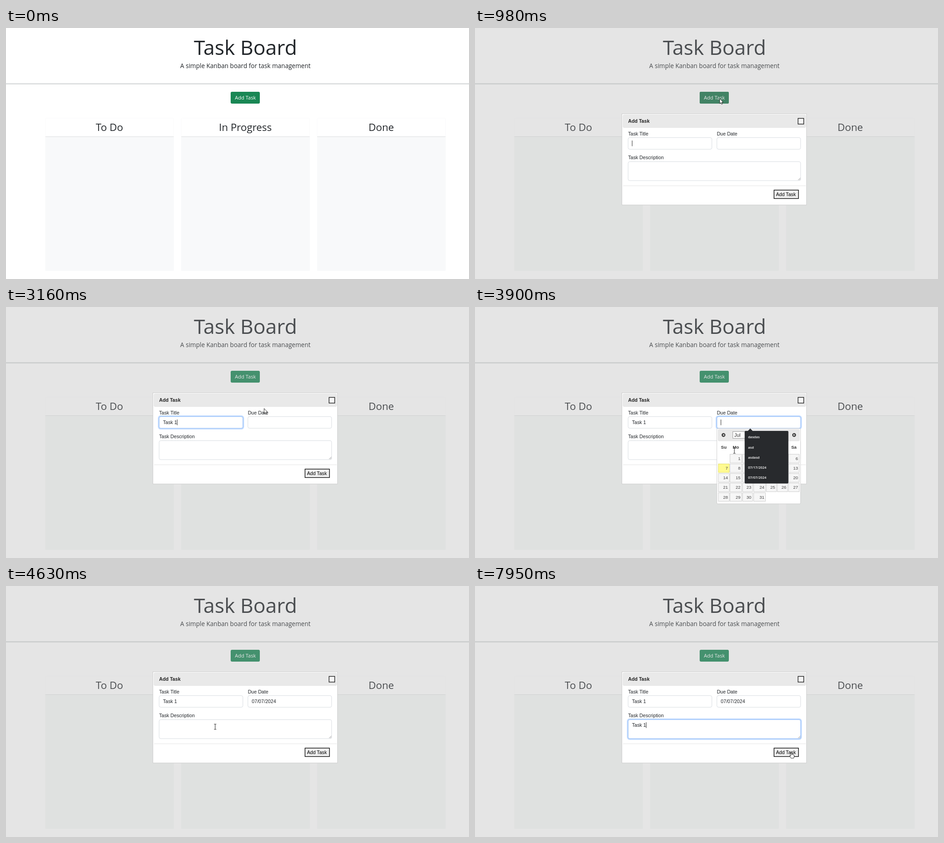
Animation of 1016x551 px, one loop 8 s. Source, as an HTML page:

```html
<!DOCTYPE html>
<html lang="en">
<head>
<meta charset="utf-8">
<title>Task Board</title>
<style>
html, body { margin: 0; width: 100%; height: 100%; overflow: hidden; background: #fff; }
svg { display: block; }
text { font: 10.65px "Liberation Sans", Arial, sans-serif; fill: #212529; white-space: pre; }
.page text { font-family: "Open Sans", sans-serif; text-anchor: middle; }
.page .title { font-size: 44.4px; }
.page .lead { font-size: 13.55px; }
.page .head { font-size: 22.3px; }
.page .btn { font-size: 11.1px; fill: #fff; }
.bold { font-weight: 700; }
.field { fill: #fff; stroke: #ced4da; stroke-width: .8; }
.ring rect { fill: none; stroke: #c2dbfe; stroke-width: 2.7; }
.ring rect + rect { stroke: #86b7fe; stroke-width: .8; }
.menu rect, .menu path { fill: #282a2d; }
.menu text { font: 600 7.5px "Open Sans", sans-serif; fill: #fff; }
.cal text { font-size: 9.6px; fill: #333; }
.cal .day { text-anchor: end; fill: #454545; }
.cal .mid { text-anchor: middle; }
</style>
</head>
<body>
<svg width="1016" height="551" viewBox="0 0 1016 551">
  <g class="page">
    <rect width="1016" height="551" fill="#fff"/>
    <text class="title" x="525.5" y="59">Task Board</text>
    <text class="lead" x="525.3" y="88.2">A simple Kanban board for task management</text>
    <rect y="121" width="1016" height="3" fill="#dee0e1"/>
    <rect x="493" y="140" width="64" height="26" rx="3" fill="#198754"/>
    <rect id="hover" x="493" y="140" width="64" height="26" rx="3" fill="#157347"/>
    <text class="btn" x="525.3" y="157">Add Task</text>
    <g id="columns"></g>
  </g>

  <g id="modal">
    <rect width="1016" height="551" fill="#aaa" opacity=".3"/>
    <g id="shade"></g>
    <rect x="322.3" y="188.3" width="405.2" height="200" fill="#fff" stroke="#c5c5c5" stroke-width=".8"/>
    <rect x="324.8" y="190.8" width="401" height="27.6" rx="2" fill="#e9e9e9" stroke="#ddd" stroke-width=".7"/>
    <text class="bold" x="336" y="208" style="fill:#222">Add Task</text>
    <rect x="708.9" y="198.4" width="12.5" height="12.5" fill="#f6f6f6" stroke="#111" stroke-width="1.3"/>
    <text x="336" y="236">Task Title</text>
    <text x="530.7" y="236">Due Date</text>
    <text x="336" y="288.2">Task Description</text>
    <g id="fields"></g>
    <path d="M709 334l5-5M711.7 334l2.3-2.3" stroke="#777" stroke-width=".7"/>
    <path d="M325 346.4H726" stroke="#ddd" stroke-width=".8"/>
    <rect x="656.2" y="355.8" width="53.6" height="18.6" fill="#efefef" stroke="#000" stroke-width="1.33"/>
    <text x="660.4" y="368.5" style="fill:#000">Add Task</text>
    <path id="caret" d="M.4 0v12.5" stroke="#111" stroke-width=".9"/>
  </g>

  <g id="calendar" class="cal">
    <rect x="530.7" y="266.8" width="183.7" height="165.2" rx="2" fill="#fff" stroke="#c5c5c5" stroke-width=".8"/>
    <rect x="533.5" y="269" width="178.4" height="25" rx="2" fill="#e9e9e9" stroke="#ddd" stroke-width=".7"/>
    <g fill="#444"><circle cx="545.3" cy="281" r="4.2"/><circle cx="700.3" cy="281" r="4.2"/></g>
    <path d="M546.6 278.7v4.6l-3-2.3zM699 278.7v4.6l3-2.3z" fill="#fff"/>
    <g fill="#fff" stroke="#767676" stroke-width=".7">
      <rect x="565.8" y="273.6" width="55" height="14.6"/><rect x="623.6" y="273.6" width="56" height="14.6"/>
    </g>
    <text x="569" y="285" style="font-size:10.65px">Jul</text>
    <text x="627" y="285" style="font-size:10.65px">2024</text>
    <g id="days"></g>
  </g>

  <g id="titleMenu" class="menu"></g>
  <g id="dateMenu" class="menu"></g>

  <g id="pointer" stroke="#000" stroke-linejoin="round">
    <path d="M0 0V11L2.5 8.7L4.2 12.4L6 11.6L4.4 8H7.7Z" fill="#fff" stroke-width=".8"/>
    <path d="M-2.4 -5.8H-.7L0 -5.3L.7 -5.8H2.4M0 -5.3V5.3M-2.4 5.8H-.7L0 5.3L.7 5.8H2.4" fill="none" stroke-width=".9"/>
    <path d="M-1 1Q-1 0 0 0T1 1V4.6Q2.3 4 3 5Q4.3 4.6 4.9 5.7Q6.3 5.5 6.3 7V9.3Q6.3 11 5.2 13H-.6Q-1.3 11.2-3.5 8.2Q-4 6.7-2.7 6.7L-1 8.2Z" fill="#fff" stroke-width=".8"/>
  </g>
</svg>
<script>
const $ = id => document.getElementById(id);
const clamp = v => Math.max(0, Math.min(1, v));
const show = (el, on) => el.style.display = on ? '' : 'none';

const box = (x, y, w, h, attrs) => `<rect x="${x}" y="${y}" width="${w}" height="${h}" ${attrs || ''}/>`;
const label = (x, y, s, cls) => `<text x="${x}" y="${y}" class="${cls || ''}">${s}</text>`;

const columnX = i => 86.5 + i * 298.2;
const lane = (i, fill) => box(columnX(i), 239, 281.5, 294, `fill="${fill}"`);
$('columns').innerHTML = ['To Do', 'In Progress', 'Done'].map((name, i) =>
  box(columnX(i), 198, 281.5, 335, 'rx="2" fill="#fff" stroke="#f8f8f9" stroke-width=".7"') +
  lane(i, '#f8f9fa') +
  box(columnX(i), 238, 281.5, 1.1, 'fill="#dfe0e1"') +
  label(columnX(i) + 140.5, 225.6, name, 'head')).join('');
$('shade').innerHTML = [0, 1, 2].map(i => lane(i, '#dfe1e0')).join('');

const fields = [
  { x: 336, y: 240.6, w: 183.8, h: 25.6, from: 980, to: 3560 },
  { x: 530.8, y: 240.6, w: 183.8, h: 25.6, from: 3560, to: 4160 },
  { x: 336, y: 293.4, w: 378.6, h: 41.6, from: 5360, to: 9000 }
];
$('fields').innerHTML = fields.map(({ x, y, w, h }, i) =>
  box(x, y, w, h, 'rx="3.5" class="field"') +
  `<g class="ring">${box(x - 1.3, y - 1.3, w + 2.6, h + 2.6, 'rx="4.5"')}${box(x, y, w, h, 'rx="3.5"')}</g>` +
  label(x + 8.5, i < 2 ? 257 : 309.2, '', 'value')).join('');
const rings = document.querySelectorAll('.ring');
const values = document.querySelectorAll('.value');

// July 2024 starts on a Monday
const cols = [[534, 24], [559.4, 26], [587.2, 22], [611.6, 26], [639.4, 22], [663.6, 22.4], [688, 23.6]];
let days = cols.map(([x, w], i) => label(x + w / 2, 311, ['Su', 'Mo', 'Tu', 'We', 'Th', 'Fr', 'Sa'][i], 'bold mid')).join('');
for (let d = 1; d <= 31; d++) {
  const [x, w] = cols[d % 7], y = 323.2 + 21.15 * Math.floor(d / 7);
  const look = d == 7 ? 'fill="#fffa90" stroke="#dad55e"' : 'fill="#f6f6f6" stroke="#c5c5c5"';
  days += box(x, y, w, 18.8, look + ' stroke-width=".8"') + label(x + w - 2.8, y + 12.8, d, 'day');
}
$('days').innerHTML = days;

function fillMenu(el, x, items) {
  el.innerHTML = `<path d="M${x + 12.3} 266.8l5.4 5.4h-10.8z"/>` +
    box(x, 272, 96, 22.3 * items.length + 4, 'rx="2"') +
    items.map((s, i) => label(x + 7.5, 288.4 + 22.25 * i, s)).join('');
}
fillMenu($('dateMenu'), 591.7, ['dasdas', 'asd', 'asdasd', '07/17/2024', '07/07/2024']);

const titleKeys = [980, 1840, 2110, 2300, 2440, 2500, 2700];
const noteKeys = [5360, 6160, 6420, 6560, 6690, 6760, 6890];

const ARROW = 0, BEAM = 1, HAND = 2;
const track = [
  [110, 896, 499, ARROW], [310, 800, 400, ARROW], [510, 690, 290, ARROW], [710, 578, 192, ARROW],
  [800, 547, 163, HAND], [910, 537, 155, HAND], [970, 537, 155, ARROW], [1240, 538, 155, ARROW],
  [2700, 538, 155, ARROW], [2960, 548, 185, ARROW], [3160, 566, 222, ARROW], [3360, 577, 245, BEAM],
  [3500, 579, 252, BEAM], [3700, 577, 266, BEAM], [3890, 570, 314, BEAM], [4080, 549, 350, HAND],
  [4290, 546, 354, HAND], [4400, 514, 341, ARROW], [4500, 480, 322, BEAM], [4620, 459, 309, BEAM],
  [5570, 459, 309, BEAM], [5690, 467, 307, BEAM], [7230, 467, 307, BEAM], [7430, 530, 325, BEAM],
  [7560, 610, 350, ARROW], [7700, 688, 374, HAND], [7790, 704, 378, ARROW], [7870, 699, 370, HAND],
  [7945, 694, 365, HAND], [9000, 694, 365, HAND]
];

function movePointer(t) {
  show($('pointer'), t >= 110);
  if (t < 110) return;
  const i = track.findIndex(k => k[0] > t);
  const [t0, x0, y0, shape] = track[i - 1], [t1, x1, y1] = track[i];
  const p = (t - t0) / (t1 - t0);
  $('pointer').setAttribute('transform', `translate(${x0 + (x1 - x0) * p} ${y0 + (y1 - y0) * p})`);
  [...$('pointer').children].forEach((el, n) => show(el, n == shape));
}

function draw(t) {
  // pointer and fades advance in steps of about 1/15 s
  const q = 110 + 66.45 * Math.floor((t - 102) / 66.45);
  const pulse = (from, to, ms) => clamp((q - from) / ms) - clamp((q - to) / ms);
  const typed = keys => 'Task 1'.slice(0, Math.max(0, keys.filter(k => k <= t).length - 1));

  $('hover').setAttribute('opacity', pulse(760, 980, 140));
  show($('modal'), t >= 980);
  const texts = [typed(titleKeys), t >= 4290 ? '07/07/2024' : '', typed(noteKeys)];
  fields.forEach((f, i) => {
    rings[i].setAttribute('opacity', pulse(f.from, f.to, 130));
    values[i].textContent = texts[i];
  });

  const active = fields.findIndex(f => t >= f.from && t < f.to);
  show($('caret'), false);
  if (active >= 0) {
    const f = fields[active];
    const last = Math.max(...[...titleKeys, 3560, ...noteKeys].filter(k => k <= t));
    const x = f.x + 8.5 + (texts[active] ? values[active].getComputedTextLength() : 0);
    $('caret').setAttribute('transform', `translate(${x} ${active < 2 ? 247 : 299.2})`);
    show($('caret'), Math.floor((t - last) / 530) % 2 == 0);
  }

  show($('titleMenu'), t >= 1840 && t < 2700);
  fillMenu($('titleMenu'), 396.2, t < 2500 ? ['task 2', 'task 3', 'task', 'TASK 4'] : ['task 2', 'task 3', 'TASK 4']);
  $('calendar').setAttribute('opacity', pulse(3560, 4290, 200));
  show($('dateMenu'), t >= 3620 && t < 4160);
  movePointer(q);
}

function frame() {
  draw(performance.now() % 8000);
  requestAnimationFrame(frame);
}
frame();
</script>
</body>
</html>
```
